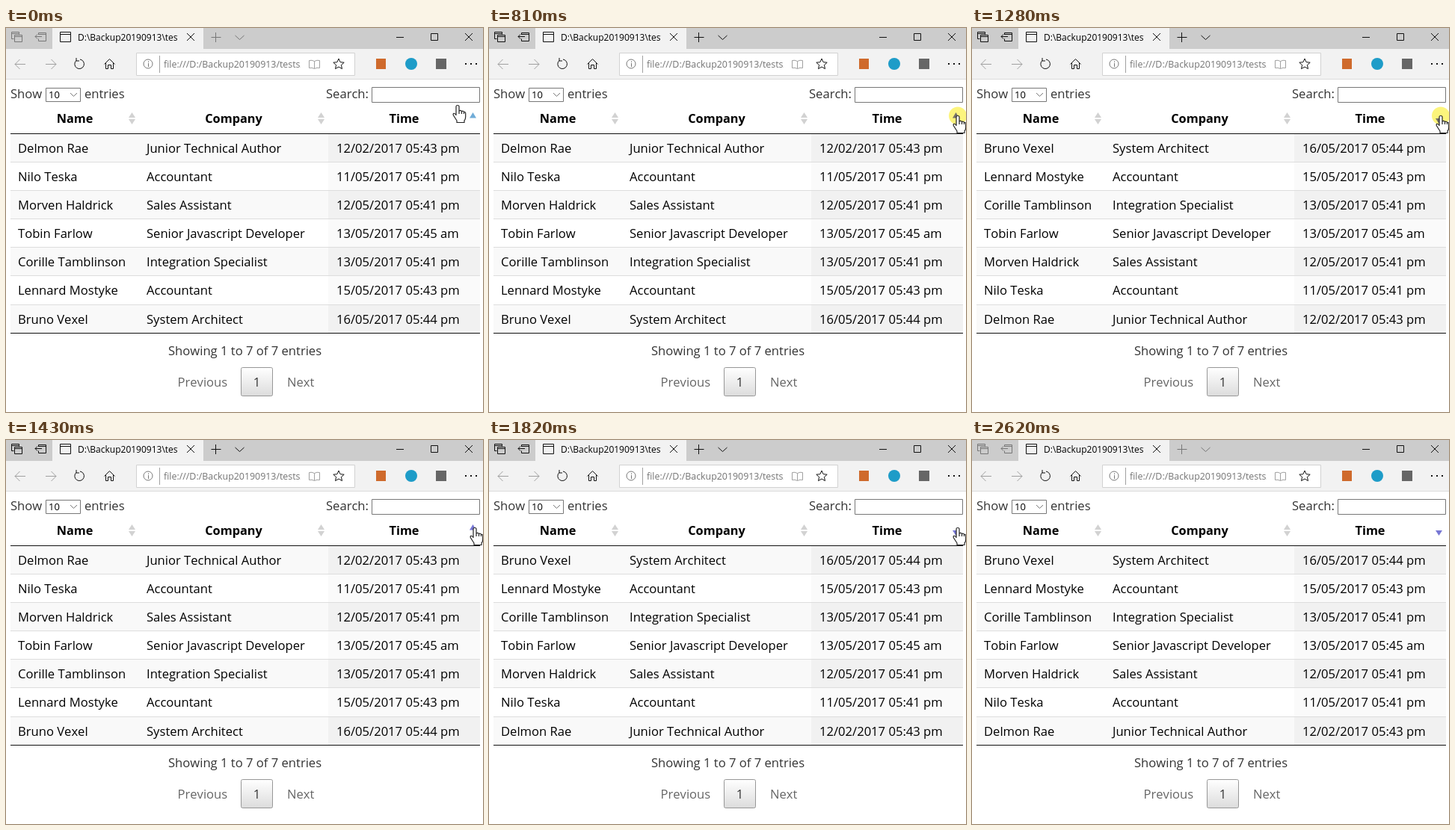
An HTML page that plays this animation: 638 by 514 pixels, repeating every 2.68 s.

```html
<!DOCTYPE html>
<html lang="en">
<head>
<meta charset="utf-8">
<title>Sortable table</title>
<style>
html, body { margin: 0; width: 100%; height: 100%; overflow: hidden; background: #fff; }
svg { display: block; width: 638px; height: 514px; }
text { font: 16.6px "Open Sans", "Noto Sans", sans-serif; font-kerning: none; fill: #000; white-space: pre; }
.head { font-size: 16.3px; font-weight: 700; }
.note { fill: #333; }
.off { fill: #666; }
.small { font-size: 12px; }
.url { font-size: 12.4px; fill: #747474; }
.line { fill: none; stroke: #111; stroke-width: 1; }
.pale { stroke: #a0a0a0; }
.grey { stroke: #777; }
#spot { mix-blend-mode: multiply; }
</style>
</head>
<body>
<svg id="stage" viewBox="0 0 638 514">
  <defs>
    <linearGradient id="button" x2="0" y2="1"><stop stop-color="#fff"/><stop offset="1" stop-color="#dcdcdc"/></linearGradient>
    <clipPath id="tabClip"><path d="M90 0H230V27H90Z"/></clipPath>
    <clipPath id="urlClip"><path d="M206 33H394V64H206Z"/></clipPath>
  </defs>

  <g id="titleBar">
    <path fill="#ccc" d="M0 0H638V28H0Z"/>
    <path fill="#f2f2f2" d="M62 0H264V28H62ZM0 28H638V68H0Z"/>
    <path fill="#dcdcdc" d="M0 68H638V69H0Z"/>
    <g id="tabTools" class="line">
      <path d="M10.5 14.5H7.5V5.5H17.5V8.5M7.5 7.5H17.5M11.5 9.5H21.5V18.5H11.5ZM11.5 11.5H21.5"/>
      <path d="M43.5 6.5H53.5V17.5H43.5V14.5M43.5 9V6.5M43.5 8.5H53.5M39 11.5H48M42 8.5L39 11.5L42 14.5"/>
      <path d="M274.5 12.5H287.5M280.5 6V19M306.5 10L312.5 15.5L318.5 10"/>
    </g>
    <path class="line" d="M72.5 5.5H86.5V18.5H72.5ZM72.5 8.5H86.5M242 7L252 17M252 7L242 17"/>
    <path class="line" d="M522 12.5H532M568.5 7.5H577.5V16.5H568.5ZM614 7L624 17M624 7L614 17"/>
    <text class="small" x="96" y="16.5" clip-path="url(#tabClip)">D:\Backup20190913\test</text>
  </g>

  <g id="toolBar">
    <path fill="#fff" stroke="#d2d2d2" d="M174.5 33.5H466.5V63.5H174.5Z"/>
    <path class="line pale" d="M26 48.5H12M18.5 42L12 48.5L18.5 55M53 48.5H67M60.5 42L67 48.5L60.5 55"/>
    <path class="line" stroke-width="1.3" d="M94 43.5A6.3 6.3 0 1 0 99 42M94 40V44H98"/>
    <path class="line" d="M131.5 48.5L138.5 41.5L145.5 48.5M133.5 47V54.5H136.5V49.5H140.5V54.5H143.5V47"/>
    <path class="line grey" d="M184 48A6 6 0 0 1 196 48A6 6 0 0 1 184 48M190.5 47V52M190.5 44.5V46"/>
    <path class="line pale" d="M205.5 37V60M412.5 44.5Q409 42.5 405.5 43.5V53.5Q409 52.5 412.5 54.5Q416 52.5 419.5 53.5V43.5Q416 42.5 412.5 44.5V54"/>
    <path class="line" d="M445 41L447.1 45.7L452.2 46.2L448.4 49.6L449.5 54.6L445 52L440.5 54.6L441.6 49.6L437.8 46.2L442.9 45.7Z"/>
    <path fill="#cf6a2c" d="M495 41H508V55H495Z"/>
    <circle cx="542" cy="48" r="8" fill="#1e9cc8"/>
    <path fill="#666" d="M575 41H589V55H575Z"/>
    <path fill="#111" d="M614 47H616V49H614ZM621 47H623V49H621ZM628 47H630V49H628Z"/>
    <text class="url" x="211" y="52.5" clip-path="url(#urlClip)">file:///D:/Backup20190913/tests/</text>
  </g>

  <g id="controls">
    <text class="note" x="6" y="94">Show</text>
    <path class="line grey" fill="#fff" d="M53.5 80.5H99.5V98.5H53.5ZM86 87L90.5 91.5L95 87"/>
    <text x="57" y="94" style="font-size:13px">10</text>
    <text class="note" x="105" y="94">entries</text>
    <text class="note" x="428" y="94">Search:</text>
    <path id="search" class="line grey" d="M489.5 79.5H633.5V99.5H489.5Z"/>
    <text class="head" x="92" y="127" text-anchor="middle">Name</text>
    <text class="head" x="304.5" y="127" text-anchor="middle">Company</text>
    <text class="head" x="532.5" y="127" text-anchor="middle">Time</text>
    <path fill="#d2d2d2" d="M164 120L168.5 113L173 120ZM164 122H173L168.5 129ZM417 120L421.5 113L426 120ZM417 122H426L421.5 129Z"/>
  </g>

  <g id="rows"></g>

  <g id="footer">
    <path fill="#111" d="M6 141H634V142H6ZM6 408H634V409H6Z"/>
    <text class="note" x="217" y="438">Showing 1 to 7 of 7 entries</text>
    <text class="off" x="229.5" y="480">Previous</text>
    <rect x="314.5" y="454.5" width="42" height="38" rx="2" fill="url(#button)" stroke="#979797"/>
    <text class="note" x="335.5" y="480" text-anchor="middle">1</text>
    <text class="off" x="376" y="480">Next</text>
  </g>

  <path id="sortMark"/>
  <circle id="spot" cx="627" cy="117.5" r="12" fill="#fcf47c"/>
  <g id="cursor" stroke="#222" stroke-width="1.2" stroke-linejoin="round" fill="#fff">
    <path id="hand" d="M-2 2Q-2 .5 0 .5T2 2V8Q4 6.5 5.5 8.5Q7.5 7.5 8.5 9.5Q10.5 9 10.7 11V16Q10.7 19 9 21V23.5H-1V21Q-3 18 -5.5 14Q-6.5 12 -5 11.3Q-3.5 11 -2 13.5ZM-2 13.5V2M2 8V12M5.5 8.5V12M8.5 9.5V12"/>
    <path id="beam" fill="none" d="M-3 -10H-1L0 -9L1 -10H3M0 -9V9M-3 10H-1L0 9L1 10H3"/>
    <path id="arrow" d="M0 0V17L4 13L7 19.5L9.5 18.5L6.7 12H12Z"/>
  </g>
</svg>
<script>
const LOOP = 2680;
const $ = id => document.getElementById(id);

const people = [
  ["Delmon Rae", "Junior Technical Author", "12/02/2017 05:43 pm"],
  ["Nilo Teska", "Accountant", "11/05/2017 05:41 pm"],
  ["Morven Haldrick", "Sales Assistant", "12/05/2017 05:41 pm"],
  ["Tobin Farlow", "Senior Javascript Developer", "13/05/2017 05:45 am"],
  ["Corille Tamblinson", "Integration Specialist", "13/05/2017 05:41 pm"],
  ["Lennard Mostyke", "Accountant", "15/05/2017 05:43 pm"],
  ["Bruno Vexel", "System Architect", "16/05/2017 05:44 pm"]
];

// Each step holds from its time until the next one.
const cursorSteps = [
  [0, "hand", 604, 103], [70, "beam", 607, 94], [140, "beam", 611, 85],
  [210, "beam", 616, 77], [280, "beam", 620, 83], [350, "beam", 623, 94],
  [430, "hand", 625, 105], [500, "hand", 626, 111], [580, "hand", 626, 116],
  [660, "hand", 627, 117], [1980, "arrow", 574, 174], [2050, "arrow", 424, 288],
  [2130, "arrow", 218, 410], [2200, "arrow", 51, 496], [2280, "none", 0, 0]
];
const orderSteps = [[0, false], [890, true], [1430, false], [1820, true]];
const spotSteps = [[0, false], [810, true], [890, false], [1280, true], [1430, false], [1750, true], [1820, false]];
const toolSteps = [[0, "#777"], [810, "#111"], [2530, "#444"], [2620, "#777"]];
const markSteps = [[0, "#70acd8"], [810, "#7777d4"]];

const at = (steps, time) => steps.findLast(step => step[0] <= time);
const show = (id, visible) => { $(id).style.display = visible ? "" : "none"; };

function add(parent, tag, attributes) {
  const node = document.createElementNS("http://www.w3.org/2000/svg", tag);
  for (const key in attributes) node.setAttribute(key, attributes[key]);
  return parent.appendChild(node);
}

const columns = [16, 188, 442];
const cells = people.map((_, i) => {
  const top = 141 + 38 * i + (i > 5 ? 1 : 0);
  const odd = i % 2 === 0;
  const bar = (x, y, width, height, fill) => add($("rows"), "rect", { x, y, width, height, fill });
  bar(6, top, 425, 39, odd ? "#f9f9f9" : "#fff");
  bar(431, top, 203, 39, odd ? "#f1f1f1" : "#fafafa");
  bar(6, top, 628, 1, "#ddd");
  return columns.map(x => add($("rows"), "text", { x, y: top + 26 }));
});

let shownOrder = null;
function setOrder(descending) {
  if (descending === shownOrder) return;
  shownOrder = descending;
  const list = descending ? [...people].reverse() : people;
  cells.forEach((row, i) => row.forEach((cell, j) => { cell.textContent = list[i][j]; }));
  $("sortMark").setAttribute("d", descending ? "M620 121H629L624.5 128Z" : "M620 120.5L624.5 113L629 120.5Z");
}

function draw(time) {
  const [, shape, x, y] = at(cursorSteps, time);
  for (const id of ["hand", "beam", "arrow"]) show(id, id === shape);
  $("cursor").setAttribute("transform", `translate(${x} ${y})`);
  $("search").style.stroke = shape === "beam" ? "#333" : "#777";
  setOrder(at(orderSteps, time)[1]);
  show("spot", at(spotSteps, time)[1]);
  $("tabTools").style.stroke = at(toolSteps, time)[1];
  $("sortMark").setAttribute("fill", at(markSteps, time)[1]);
}

const start = performance.now();
function tick() {
  draw((performance.now() - start) % LOOP);
  requestAnimationFrame(tick);
}
tick();
</script>
</body>
</html>
```
